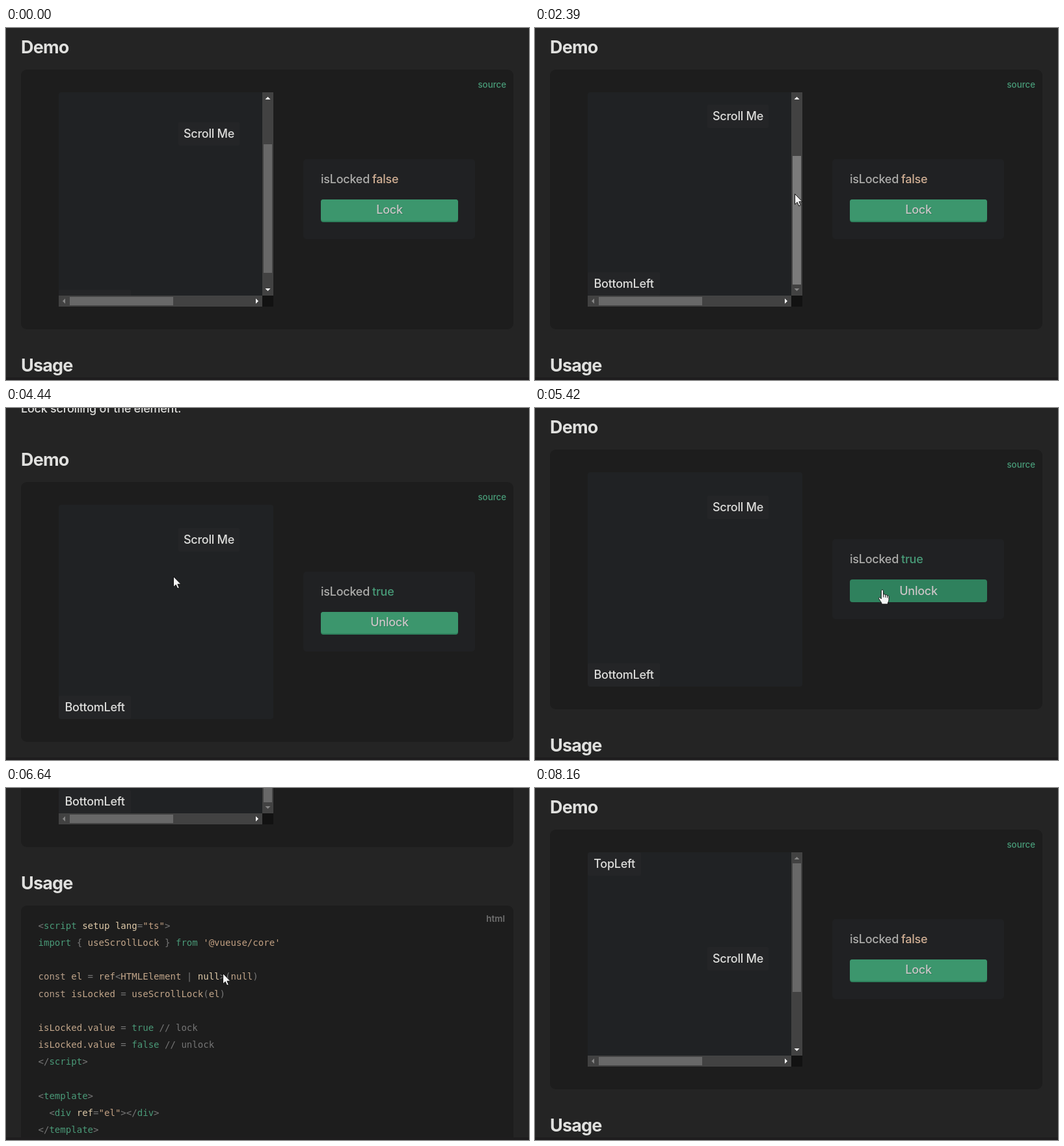
Recreate the animation shown at these times as an HTML page with a canvas. Size 804x542 px, loop 8760 ms.

```html
<!DOCTYPE html>
<html lang="en">
<head>
<meta charset="utf-8">
<title>Scroll lock demo</title>
<style>
html, body { margin: 0; width: 100%; height: 100%; overflow: hidden; background: #242424; }
canvas { display: block; width: 804px; height: 542px; }
</style>
</head>
<body>
<canvas id="stage"></canvas>
<script>
const W = 804, H = 542, LOOP = 8760, STEP = 70;
const canvas = document.getElementById('stage');
const ctx = canvas.getContext('2d');
const dpr = window.devicePixelRatio || 1;
canvas.width = W * dpr;
canvas.height = H * dpr;

const SANS = 'Inter, "Noto Sans", sans-serif';
const MONO = '"DejaVu Sans Mono", "Noto Sans Mono", monospace';
const BOX = { x: 81, y: 99, size: 330, bar: 17, content: 440 };
const BUTTON = { x: 484, y: 264, w: 211, h: 35 };

const INK = { p: '#777777', g: '#4a9a78', a: '#dfcaa9', s: '#c3a183', k: '#b69e88', v: '#c2a68a', c: '#757575' };
// Each piece between backticks starts with its colour letter.
const CODE = [
  'p<`gscript`a setup lang`p=`s"ts"`p>',
  "gimport`p { `vuseScrollLock`p } `gfrom`s '@vueuse/core'",
  '',
  'kconst `vel`p = `vref`p<`vHTMLElement`p | `anull`p>(`vnull`p)',
  'kconst `visLocked`p = `vuseScrollLock`p(`vel`p)',
  '',
  'visLocked.value`p = `gtrue`c // lock',
  'visLocked.value`p = `gfalse`c // unlock',
  'p</`gscript`p>',
  '',
  'p<`gtemplate`p>',
  'p  <`gdiv`a ref`p=`s"el"`p></`gdiv`p>',
  'p</`gtemplate`p>'
];

// Eased progress from 0 to 1, sampled in steps counted from the start.
function glide(t, from, to) {
  if (t <= from) return 0;
  if (t >= to) return 1;
  const p = Math.floor((t - from) / STEP) * STEP / (to - from);
  return p * p * (3 - 2 * p);
}

function innerScroll(t) {
  const max = BOX.content - BOX.size + BOX.bar;
  const lockShift = glide(t, 2800, 2870) - glide(t, 5890, 5960);
  return 100 * (1 - glide(t, 1100, 1380)) - BOX.bar * lockShift
    + max * (glide(t, 1710, 1990) - glide(t, 7130, 7620));
}

function pageScroll(t) {
  return 200 * (glide(t, 3340, 3760) - glide(t, 3760, 4110))
    - 100 * (glide(t, 4300, 4580) - glide(t, 4720, 5000))
    + 400 * (glide(t, 5890, 6510) - glide(t, 6570, 7010));
}

function pointerAt(t) {
  let x = 640, y = 467;
  const move = (from, to, toX, toY) => {
    const p = glide(t, from, to);
    x += (toX - x) * p;
    y += (toY - y) * p;
  };
  move(260, 820, 430, 138);
  move(820, 1100, 325, 241);
  move(2250, 2600, 535, 280);
  move(3130, 3340, 257, 259);
  move(5000, 5350, 535, 280);
  move(5680, 5890, 333, 285);
  move(7480, 7620, 401, 255);
  move(7810, 8160, 522, 542);
  return [Math.round(x), Math.round(y)];
}

function rect(x, y, w, h, color, r = 0) {
  ctx.fillStyle = color;
  ctx.beginPath();
  ctx.roundRect(x, y, w, h, r);
  ctx.fill();
}

function text(str, x, y, color, { size = 18, weight = 450, align = 'left', gap = -0.25, font = SANS } = {}) {
  ctx.font = `${weight} ${size}px ${font}`;
  ctx.letterSpacing = gap + 'px';
  ctx.textAlign = align;
  ctx.fillStyle = color;
  ctx.fillText(str, x, y);
}

function heading(str, y) {
  text(str, 23, y, '#e0e0de', { size: 27, weight: 650, gap: -0.85 });
}

function label(str, x, y, w) {
  rect(x, y, w, 36, '#242527', 2);
  text(str, x + w / 2, y + 24, '#dededc', { align: 'center' });
}

function triangle(x, y, angle, active) {
  ctx.save();
  ctx.translate(x, y);
  ctx.rotate(angle);
  ctx.fillStyle = active ? '#ffffff' : '#868686';
  ctx.beginPath();
  ctx.moveTo(-4, 2);
  ctx.lineTo(0, -2);
  ctx.lineTo(4, 2);
  ctx.fill();
  ctx.restore();
}

function scrollbars(scroll, hover) {
  const { x, y, size, bar, content } = BOX;
  const view = size - bar, rail = view - 2 * bar;
  const right = x + view, bottom = y + view;
  rect(right, y, bar, view, '#424242');
  rect(x, bottom, view, bar, '#424242');
  rect(right, bottom, bar, bar, '#121212');
  rect(right + 2, Math.round(y + bar + scroll * rail / content), 13, Math.round(view * rail / content),
    hover ? '#7b7b7b' : '#686868');
  rect(x + bar, bottom + 2, 159, 13, '#686868');
  triangle(right + 8.5, y + 9, 0, scroll > 0);
  triangle(right + 8.5, bottom - 9, Math.PI, scroll < content - view);
  triangle(x + 8, bottom + 8.5, -Math.PI / 2, false);
  triangle(right - 8, bottom + 8.5, Math.PI / 2, true);
}

function scrollBox(scroll, locked, hover) {
  const { x, y, size, bar, content } = BOX;
  const view = locked ? size : size - bar;
  ctx.save();
  ctx.beginPath();
  ctx.roundRect(x, y, view, view, locked ? 4 : [4, 0, 0, 0]);
  ctx.clip();
  rect(x, y, view, view, '#202224');
  const top = y - scroll;
  label('TopLeft', x, top, 82);
  label('Scroll Me', x + 184, top + 146, 94);
  label('BottomLeft', x, top + content - 36, 111);
  ctx.restore();
  if (!locked) scrollbars(scroll, hover);
}

function controls(locked, hover, pressed) {
  const { x, y, w, h } = BUTTON;
  rect(457, 202, 264, 123, '#202123', 5);
  text('isLocked', x, 239, '#adadab');
  text(String(locked), 563, 239, locked ? '#489b78' : '#cfae93');
  rect(x, y, w, h, '#2f815d', 4);
  if (!hover) rect(x, y, w, h - 2, '#3c966d', 4);
  ctx.shadowColor = '#2f815d';
  ctx.shadowOffsetX = ctx.shadowOffsetY = dpr;
  ctx.shadowBlur = dpr;
  text(locked ? 'Unlock' : 'Lock', x + w / 2, y + (pressed ? 24 : 22), '#c9c4c5', { align: 'center' });
  ctx.shadowColor = 'transparent';
}

function codeBlock() {
  rect(23, 554, 757, 376, '#1d1d1d', 9);
  text('html', 767, 579, '#707070', { size: 13.5, weight: 600, align: 'right', gap: 0 });
  CODE.forEach((line, row) => {
    let x = 49.5;
    for (const part of line.split('`')) {
      const str = part.slice(1);
      text(str, x, Math.round(590 + row * 26.16), INK[part[0]], { size: 14.05, weight: 400, gap: 0, font: MONO });
      x += ctx.measureText(str).width;
    }
  });
}

const ARROW = new Path2D('M0 0V16.2L3.7 12.8L6.2 18.5L8.8 17.4L6.4 11.8H11.4Z');
const HAND = new Path2D('M-1.8 1.2C-1.8 -1 1.6 -1 1.6 1.2V7C2.2 5.8 4.5 6 4.7 7.6' +
  'C5.4 6.6 7.4 7 7.6 8.6C8.4 7.9 10 8.5 10 10.2V15C10 17.5 8.4 18.5 8.2 21.5H-0.8' +
  'C-1 18.8 -3.6 16.8 -5.2 13.4C-6 11.4 -4 10.4 -2.8 12L-1.8 13.4Z');
const KNUCKLES = new Path2D('M1.6 7V11M4.7 7.6V11.4M7.6 8.6V11.8');

function pointer(x, y, hand) {
  ctx.save();
  ctx.translate(x + (hand ? -1 : 0.5), y + 0.5);
  ctx.lineJoin = 'round';
  ctx.lineWidth = 1;
  ctx.strokeStyle = '#111111';
  ctx.fillStyle = '#f4f4f4';
  const shape = hand ? HAND : ARROW;
  ctx.fill(shape);
  ctx.stroke(shape);
  if (hand) ctx.stroke(KNUCKLES);
  ctx.restore();
}

function inside(px, py, x, y, w, h) {
  return px >= x && px < x + w && py >= y && py < y + h;
}

function draw(t) {
  const page = Math.round(pageScroll(t));
  const inner = Math.round(innerScroll(t));
  const [px, py] = pointerAt(t);
  const shown = t >= 260 && t < 8160;
  const locked = t >= 2870 && t < 5490;
  const pressed = [2870, 5490].some(release => t >= release - STEP && t < release);
  const { x, y, w, h } = BUTTON;
  const onButton = shown && inside(px, py + page, x, y, w, h);
  const thumbTop = BOX.y + BOX.bar + inner * 279 / BOX.content;
  const onThumb = shown && inside(px, py + page, 394, thumbTop, 17, 198);

  ctx.setTransform(dpr, 0, 0, dpr, 0, 0);
  rect(0, 0, W, H, '#242424');
  ctx.save();
  ctx.translate(0, -page);
  text('Lock scrolling of the element.', 23, -43, '#dededc');
  heading('Demo', 39);
  rect(23, 64, 757, 400, '#1d1d1d', 9);
  text('source', 769, 92, '#489b78', { size: 13.3, weight: 500, align: 'right', gap: 0 });
  scrollBox(inner, locked, onThumb);
  controls(locked, onButton, pressed);
  heading('Usage', 529);
  codeBlock();
  ctx.restore();
  rect(0, 538, W, 4, '#1e1d1e');
  if (shown) pointer(px, py, onButton);
}

function frame(now) {
  draw(now % LOOP);
  requestAnimationFrame(frame);
}
requestAnimationFrame(frame);
</script>
</body>
</html>
```
